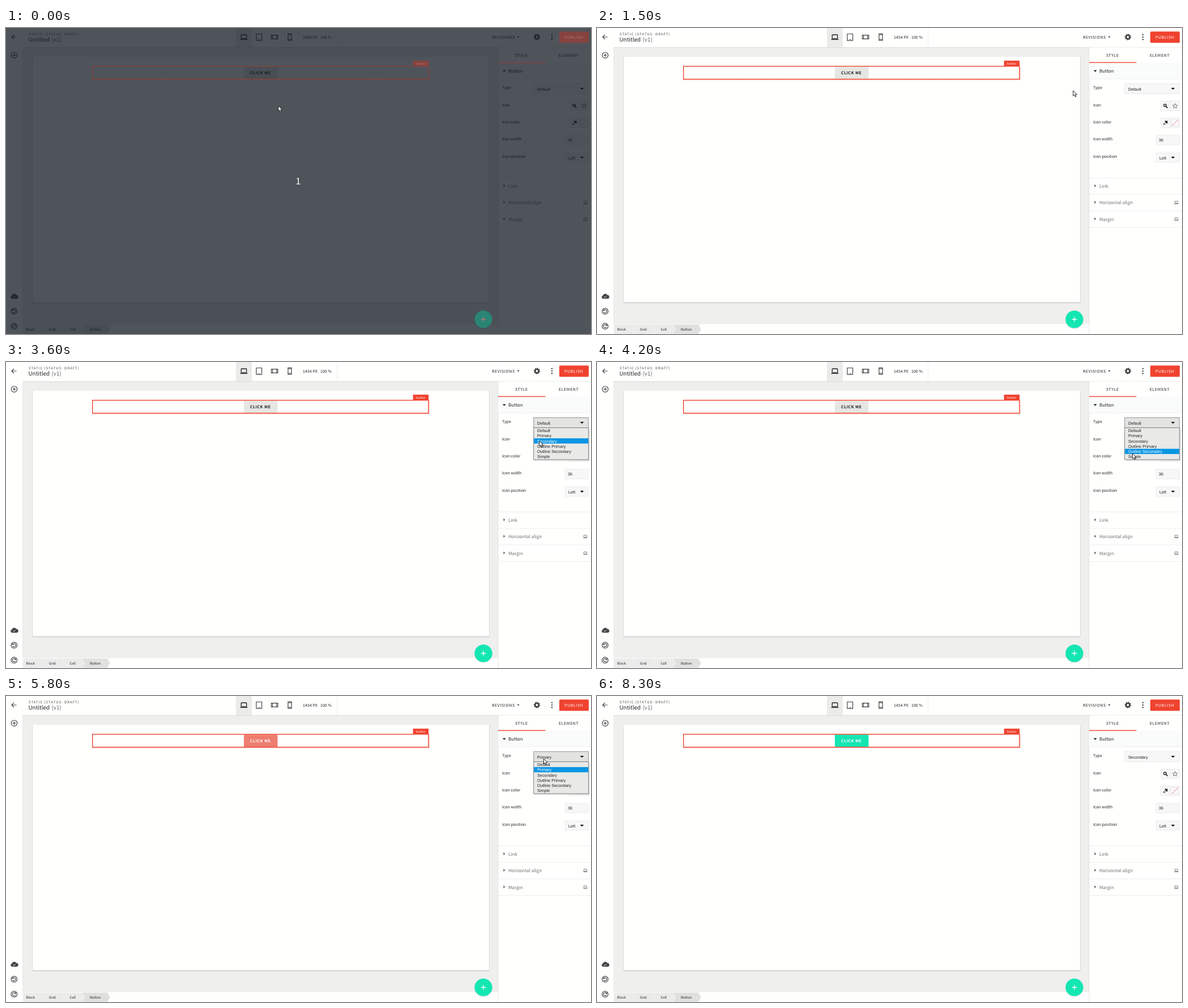
An HTML page for the animation above (8.4 s loop, 1033 by 542 pixels).

```html
<!DOCTYPE html>
<html lang="en">
<head>
<meta charset="utf-8">
<title>Button type editor</title>
<style>
html, body { margin: 0; height: 100%; overflow: hidden; background: #fffffe; }
svg { display: block; width: 100%; height: 100%; --red: #f0432f; --teal: #14e6b2; --on: #fff; }
svg.dim { --red: #86433e; --teal: #2a8474; --on: #b27a74; }
text { font-family: "Noto Sans CJK JP", "Noto Sans CJK SC", "Noto Sans CJK", "Open Sans", sans-serif; text-rendering: geometricPrecision; white-space: pre; }
text.ui { font-family: "Liberation Sans", Arial, sans-serif; }
.line { fill: none; stroke: #444; stroke-width: 1.2; }
.red { fill: var(--red); }
.teal { fill: var(--teal); }
</style>
</head>
<body>
<svg id="stage" viewBox="0 0 1033 542"></svg>
<script>
const LOOP = 8400;
const INK = '#222', GREY = '#6e6e6e', RED = 'var(--red)', ON = 'var(--on)';
const TYPES = ['Default', 'Primary', 'Secondary', 'Outline Primary', 'Outline Secondary', 'Simple'];
const LIST_TOP = 116.6, ROW = 9.28;

// Markup helpers; text is placed by the vertical centre of its capitals.
const rect = (x, y, w, h, fill, extra = '') =>
  `<rect x="${x}" y="${y}" width="${w}" height="${h}" fill="${fill}" ${extra}/>`;
const path = (d, extra = 'class="line"') => `<path d="${d}" ${extra}/>`;
const circle = (x, y, r, extra = 'class="line"') => `<circle cx="${x}" cy="${y}" r="${r}" ${extra}/>`;
const label = (x, y, s, size = 7, { fill = INK, weight = 400, gap = 0, extra = '' } = {}) =>
  `<text x="${x}" y="${y + size * .37}" font-size="${size}" font-weight="${weight}" fill="${fill}" letter-spacing="${gap}" ${extra}>${s}</text>`;
const ui = (x, y, s, extra = '', fill = INK) => label(x, y, s, 7.3, { fill, extra: `class="ui" ${extra}` });
const caret = (x, y, r = 3.4) => path(`M${x - r} ${y - r / 2}h${2 * r}l${-r} ${r}z`, 'fill="#111"');
const laptop = (x, y, k, color) =>
  `<g transform="translate(${x} ${y}) scale(${k})" stroke="${color}" fill="none">
    <rect x="-4.7" y="-4" width="9.4" height="6.8" rx=".8" stroke-width="1.3"/>
    <path d="M-6.5 4.3h13" stroke-width="1.4"/></g>`;

function header() {
  return rect(0, 0, 1033, 34, '#fffffe') + rect(0, 34, 869, 1.2, '#dededc') +
    path('M18.6 16H10M14 12l-4 4l4 4') +
    label(40, 10.3, 'STATIC (STATUS: DRAFT)', 6, { gap: 1, fill: '#444' }) +
    label(39.5, 20.5, 'Untitled', 9.9) + label(80.5, 20.5, '(v1)', 9.9, { fill: '#666' }) +
    rect(406, 0, 28, 34, '#ebebea') + rect(584, 0, .8, 34, '#ececec') +
    laptop(420, 16, 1, '#222') +
    path('M442 10.5h9.6v11.6h-9.6zM446 20.4h1.8M468.5 12.7h11.4v6.6h-11.4zM470.6 12.7v6.6M477.8 12.7v6.6') +
    path('M498 10.3h6.2v11.6h-6.2zM498 12h6.2M498 20h6.2') +
    label(524, 16, '1454 PX', 7, { gap: .08 }) + label(555, 16, '100 %', 7, { gap: .05 }) +
    label(858, 16, 'REVISIONS', 7, { weight: 500, gap: .6 }) + caret(904.5, 16, 2) +
    circle(937.5, 16, 3.2, 'fill="none" stroke="#444" stroke-width="2.6"') +
    circle(937.5, 16, 4.8, 'fill="none" stroke="#444" stroke-width="1.7" pathLength="16" stroke-dasharray="1.1 .9"') +
    [11.8, 16, 20.2].map(y => circle(964, y, 1.2, 'fill="#444"')).join('');
}

function sidebar() {
  const turn = 'M-2.6 -1.6A2.9 2.9 0 1 1 -2.4 1.8M-2.9 -3v1.9h2';
  const history = (y, flip) =>
    `<g transform="translate(14.3 ${y}) scale(${flip} 1)">${circle(0, 0, 5.3) + path(turn)}</g>`;
  return rect(0, 34, 30, 508, '#fffffe') + rect(29.4, 34, .8, 508, '#e2e2e0') +
    circle(14.5, 48.2, 5.2) + path('M11.8 48.2h5.4M14.5 45.5v5.4') +
    path('M10.8 479.5a2.9 2.9 0 0 1-.3-5.7a4.2 4.2 0 0 1 7.8-.7a3.2 3.2 0 0 1 .3 6.4z', 'fill="#444"') +
    path('M12.2 476l1.6 1.6l3-3', 'fill="none" stroke="#fff"') +
    history(501.7, 1) + history(528.2, -1);
}

function breadcrumbs() {
  const ends = [62, 98, 134, 179], names = ['Block', 'Grid', 'Cell', 'Button'], xs = [35.5, 76, 112.5, 148];
  let out = rect(30, 524.5, 839, 17.5, '#fffffe');
  for (let i = 3; i >= 0; i--)
    out += path(`M30 525H${ends[i]}l5 8.5l-5 8.5H30z`, `fill="${i == 3 ? '#e0e0df' : '#ebebea'}" stroke="#f7f7f6" stroke-width=".8"`);
  return out + names.map((s, i) => label(xs[i], 533.7, s, 6)).join('');
}

function panel() {
  const box = (x, y, w, h) => rect(x, y, w, h, '#f7f7f7', 'stroke="#e9e9e8" stroke-width=".8"');
  const fields = [['Type', 105], ['Icon', 136], ['Icon color', 166], ['Icon width', 196.3], ['Icon position', 227]];
  const groups = [['Link', 280], ['Horizontal align', 309.3], ['Margin', 338.7]];
  return rect(869, 34, 164, 508, '#fffffe') + rect(868.6, 34, .8, 508, '#dededc') + rect(869, 33.7, 164, .8, '#e6e6e4') +
    label(899, 48, 'STYLE', 7, { gap: .6 }) + label(976, 48, 'ELEMENT', 7, { gap: .6 }) +
    rect(869, 61.5, 164, 28.5, '#fafbfb') + rect(869, 89.6, 164, .8, '#ececea') +
    caret(879.8, 76.2, 2.9) + label(887, 76, 'Button', 8) +
    fields.map(([s, y]) => label(876, y, s, 7, { weight: 500 })).join('') +
    box(995.5, 129.5, 16.5, 17) + box(1012, 129.5, 16.5, 17) +
    circle(1003, 137, 2.2, 'fill="none" stroke="#111" stroke-width="1.3"') + path('M1004.6 138.7l3 3', 'stroke="#111" stroke-width="1.6"') +
    path('M1020.7 133.8l1.2 2.9l3.1.2l-2.4 2l.8 3l-2.7-1.6l-2.7 1.6l.8-3l-2.4-2l3.1-.2z', 'fill="none" stroke="#555" stroke-width=".8"') +
    box(995.5, 159.5, 16.5, 17) + box(1012, 159.5, 16.5, 17) +
    path('M1000.6 171.2l.5-1.9l3.5-3.5l1.5 1.5l-3.6 3.5z', 'fill="none" stroke="#111" stroke-width=".9"') +
    path('M1003.7 165l3.2 3.2M1005.4 166.6l1.5-1.5', 'stroke="#111" stroke-width="1.8" stroke-linecap="round"') +
    rect(1015, 162.3, 11, 11, '#fff', 'stroke="#ddd" stroke-width=".7"') + path('M1015.2 173L1026 162.5', 'stroke="#d9707f" stroke-width="1"') +
    box(987.3, 190, 41.2, 17) + ui(992, 198.5, '36') +
    box(987.3, 221, 41.2, 17) + ui(993, 230, 'Left') + caret(1017, 229.6) +
    [265.3, 294.4, 323.6, 352.8].map(y => rect(869, y, 164, .8, '#e9e9e8')).join('') +
    groups.map(([s, y]) => path(`M878.5 ${y - 3.2}l2.8 2.6l-2.8 2.6z`, 'fill="#555"') + label(887, y, s, 8, { fill: GREY })).join('') +
    laptop(1023, 309, .56, '#555') + laptop(1023, 338.5, .56, '#555');
}

const dropdown = () => '<g id="list">' +
  rect(933, 118, 98, 57, '#000', 'opacity=".1" rx="1"') +
  rect(931.7, 116.4, 97, 56.6, '#e9e9e8', 'stroke="#777" stroke-width=".9"') +
  rect(932.2, 0, 96, ROW, '#0a96e4', 'id="mark"') +
  TYPES.map((s, i) => ui(938, LIST_TOP + ROW * (i + .5), s, 'data-item')).join('') + '</g>';

const stage = document.getElementById('stage');
stage.innerHTML =
  rect(0, 0, 1033, 542, '#efefee') +
  rect(46.5, 51, 807, 436.3, '#c4c4c2', 'rx="1"') + rect(47, 51, 806, 435, '#fffffe') +
  header() + sidebar() + breadcrumbs() + panel() +
  rect(420, 68.5, 59.5, 21.7, '', 'id="button"') +
  label(431, 79.3, 'CLICK ME', 7, { weight: 700, gap: .55, extra: 'id="caption"' }) +
  rect(931.8, 98.6, 96.6, 17.8, '', 'id="select" stroke-width=".9"') + ui(938, 107.9, '', 'id="value"') + caret(1017, 107.6) +
  dropdown() +
  rect(0, 0, 1033, 542, 'rgba(21,27,36,.75)', 'id="shade"') +
  rect(152.7, 67.7, 593.3, 22.9, 'none', `stroke="${RED}" stroke-width="1.4"`) +
  path('M153 91.9H747V67.5', `fill="none" stroke="${RED}" stroke-width=".7" stroke-dasharray="1.5 1.2"`) +
  rect(718.7, 57.8, 27.5, 10, RED) + label(724, 62.8, 'button', 5.2, { fill: ON }) +
  rect(869, 60.4, 83.5, 1.4, RED) +
  rect(977, 6.2, 52, 20, RED, 'rx="1.5"') + label(986, 16.2, 'PUBLISH', 7, { fill: ON, weight: 500, gap: .6 }) +
  circle(843, 517, 16, 'fill="#000" opacity=".09"') + circle(843, 516, 15.6, 'class="teal"') +
  path('M838.8 516h8.4M843 511.8v8.4', `stroke="${ON}" stroke-width="1.3"`) +
  label(516, 271, '1', 16, { fill: '#fff', extra: 'id="count" text-anchor="middle"' }) +
  path('M0 0V9.3L2.1 7.4L3.7 10.9L5.3 10.2L3.8 6.8H6.6Z', 'id="cursor" fill="#fff" stroke="#111" stroke-width=".9" stroke-linejoin="round"');

const $ = id => document.getElementById(id);
const show = (id, on) => $(id).setAttribute('visibility', on ? 'visible' : 'hidden');
const paint = (id, attrs) => Object.entries(attrs).forEach(([k, v]) => $(id).setAttribute(k, v));

// Pointer keys: time, x, y.
const POINTER = [
  [0, 481, 138], [800, 481, 138], [900, 484, 139], [1000, 484, 139], [1700, 929, 104],
  [2000, 929, 104], [2100, 903, 98], [2200, 903, 98], [2600, 928, 110], [2700, 928, 110],
  [2800, 938.5, 111], [3200, 938.5, 111], [3600, 942, 140], [3700, 942, 140], [4200, 945.5, 162],
  [4600, 946.5, 135], [4700, 946.5, 133], [5200, 946.5, 133], [5500, 949.5, 111], [5800, 949.5, 111],
  [6100, 946, 136], [6400, 944.8, 142], [7200, 944.8, 142], [7400, 473, 125], [7500, 473, 125], [7700, 100, 47]
];

function pointerAt(t) {
  const i = POINTER.findIndex(k => k[0] > t);
  if (i < 0) return POINTER[POINTER.length - 1].slice(1);
  const [t0, x0, y0] = POINTER[i - 1], [t1, x1, y1] = POINTER[i];
  const p = (t - t0) / (t1 - t0), e = p * p * (3 - 2 * p);
  return [x0 + (x1 - x0) * e, y0 + (y1 - y0) * e];
}

const FILLS = [[230, 230, 227], [238, 126, 111], [20, 230, 178]];
const blend = (a, b, p) => `rgb(${a.map((v, i) => v + (b[i] - v) * p)})`;

function draw(now) {
  const t = Math.floor(now % LOOP / 100) * 100;   // the screen refreshes ten times a second
  const [x, y] = pointerAt(t);
  const type = t < 4900 ? 0 : t < 6700 ? 1 : 2;
  const since = t - [0, 4900, 6700][type];
  const mix = type ? Math.min(1, (since + 100) / 300) : 1;
  const focus = t >= 2500 && t < 8300;
  const open = t >= 3000 && t < 4900 || t >= 5600 && t < 6700;
  const row = y < LIST_TOP ? type : Math.min(5, Math.floor((y - LIST_TOP) / ROW));

  stage.classList.toggle('dim', t < 100);
  show('shade', t < 100);
  show('count', t < 100);
  paint('button', { fill: blend(FILLS[Math.max(0, type - 1)], FILLS[type], mix) });
  paint('caption', { fill: type ? '#fff' : '#1c1c1c' });
  paint('select', { fill: focus ? '#e3e3e2' : '#f7f7f7', stroke: focus ? '#8c8c8c' : '#e9e9e8' });
  $('value').textContent = TYPES[type];
  show('list', open);
  paint('mark', { y: LIST_TOP + row * ROW });
  document.querySelectorAll('[data-item]').forEach((el, i) => el.setAttribute('fill', i == row ? '#fff' : INK));
  show('cursor', t < 7800);
  paint('cursor', { transform: `translate(${x} ${y})` });
  requestAnimationFrame(draw);
}
requestAnimationFrame(draw);
</script>
</body>
</html>
```
